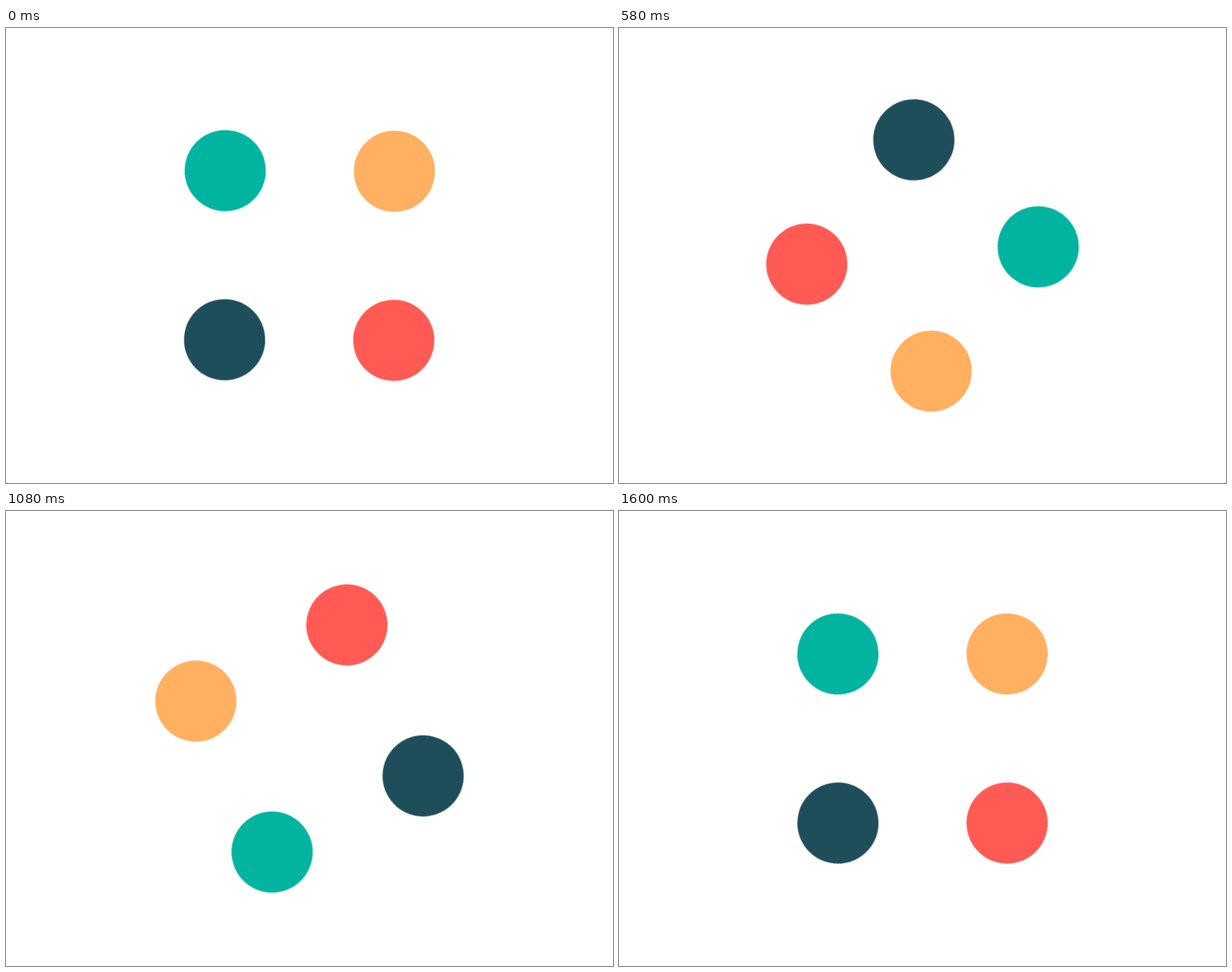
Write an HTML page without scripts that moves like this. It is 800 px wide and 600 px high and loops after 1620 ms.

```html
<!DOCTYPE html>
<html lang="en">
<head>
<meta charset="utf-8">
<title>Spinning dots</title>
<style>
  html, body { margin: 0; width: 100%; height: 100%; overflow: hidden; background: #fff; }
  svg { display: block; width: 100%; height: 100%; }

  .spin { animation: spin 1620ms linear infinite; }
  .dot { --far: 157.68px; --near: 102.5px; animation: pulse 540ms infinite; }

  /* Both end with a 20 ms rest. */
  @keyframes spin {
    from { transform: rotate(0deg); }
    98.7654%, to { transform: rotate(360deg); }
  }

  /* Draw in gently, then burst outwards and slow down. */
  @keyframes pulse {
    from { transform: translateX(var(--far)); animation-timing-function: ease-in-out; }
    37.037% { transform: translateX(var(--near)); animation-timing-function: cubic-bezier(.3333, .6667, .6667, 1); }
    96.2963%, to { transform: translateX(var(--far)); }
  }
</style>
</head>
<body>
<svg viewBox="-400 -300 800 600">
  <g class="spin">
    <g transform="rotate(-135)"><circle class="dot" r="53.5" fill="#00b4a0"/></g>
    <g transform="rotate(-45)"><circle class="dot" r="53.5" fill="#ffb061"/></g>
    <g transform="rotate(45)"><circle class="dot" r="53.5" fill="#ff5a54"/></g>
    <g transform="rotate(135)"><circle class="dot" r="53.5" fill="#1f4e5b"/></g>
  </g>
</svg>
</body>
</html>
```
